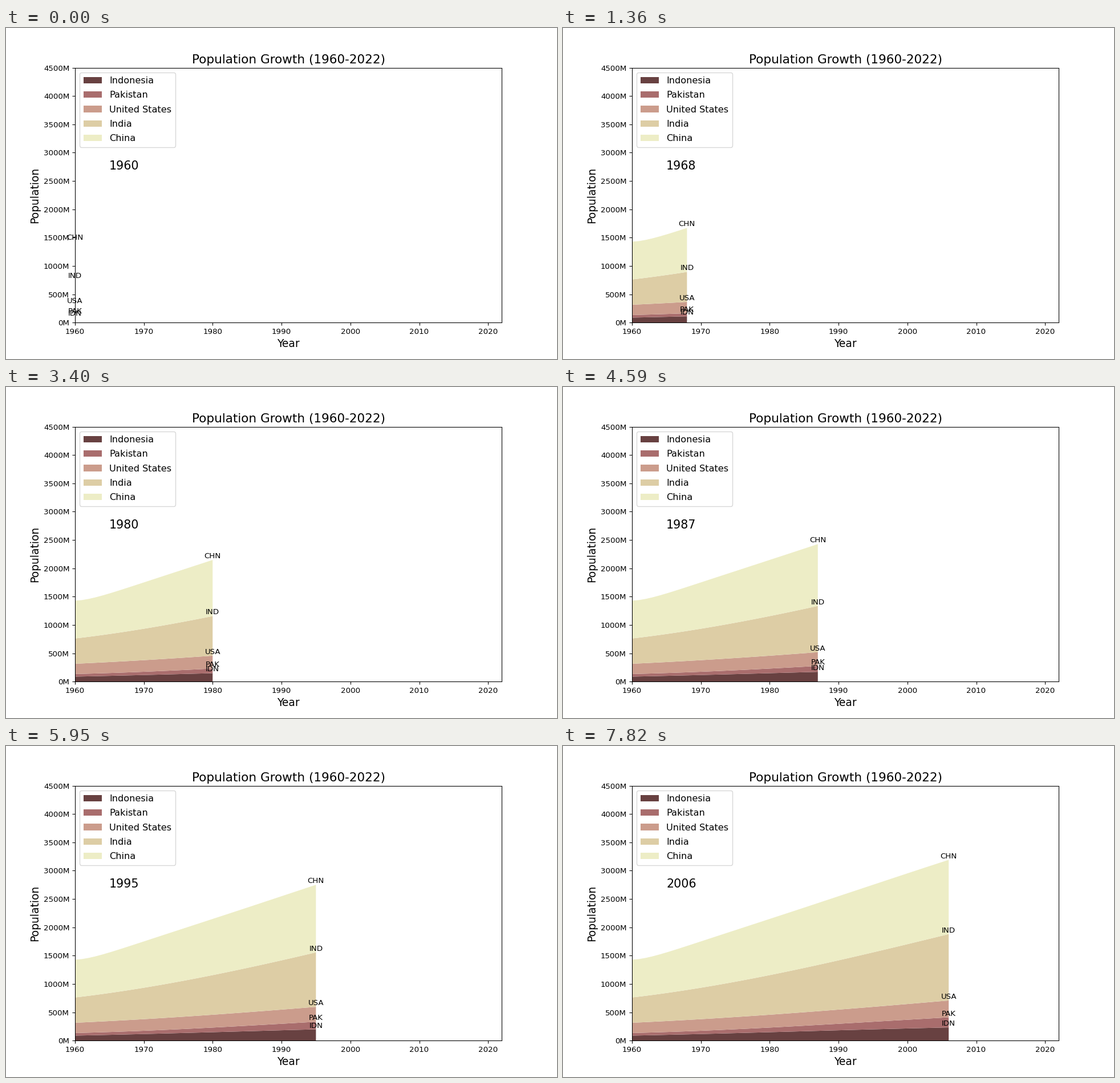
These frames come from a looping animation (966x580 px, 7.99 s). A matplotlib script:

```python
import matplotlib.pyplot as plt
import numpy as np
from matplotlib.animation import FuncAnimation
from matplotlib.patches import Patch

W, H, DPI = 966, 580, 96.6
START, END, FRAMES, STEP_MS = 1960, 2022, 47, 170

# Code, name and population in millions at the key years
KEY_YEARS = np.array([1960, 1975, 1990, 2006])
COUNTRIES = [
    ("IDN", "Indonesia", (88, 132, 182, 232)),
    ("PAK", "Pakistan", (46, 68, 115, 178)),
    ("USA", "United States", (181, 216, 250, 298)),
    ("IND", "India", (446, 623, 870, 1172)),
    ("CHN", "China", (667, 920, 1132, 1311)),
]
CODES, NAMES, KEY_POPS = zip(*COUNTRIES)
COLORS = plt.cm.pink(np.linspace(0.1, 0.8, len(COUNTRIES)))

# Smooth cubic growth, with a fading dip in the early sixties for China
t = np.arange(FRAMES)
years = START + t
cubics = np.polyfit(KEY_YEARS - START, np.transpose(KEY_POPS), 3)
pops = (np.vander(t, 4) @ cubics).T
pops[-1] -= 28 * t * np.exp(-t / 4)
tops = pops.cumsum(axis=0)

plt.rcParams["font.family"] = "DejaVu Sans"
fig, ax = plt.subplots(figsize=((W + 0.01) / DPI, (H + 0.01) / DPI), dpi=DPI)
ax.set(xlim=(START, END), ylim=(0, 4500), yticks=range(0, 4501, 500))
ax.yaxis.set_major_formatter(lambda v, pos: f"{v:.0f}M")
ax.set_title("Population Growth (1960-2022)", fontsize=16)
ax.set_xlabel("Year", fontsize=14)
ax.set_ylabel("Population", fontsize=14)
ax.legend(handles=[Patch(facecolor=c, label=n) for c, n in zip(COLORS, NAMES)],
          loc="upper left", fontsize=12, labelspacing=0.645, borderpad=0.45)

year_text = ax.text(1965, 2700, "", fontsize=15.4)
tags = [ax.text(START, 0, code, fontsize=10, ha="center", va="bottom")
        for code in CODES]
areas = []


def draw(i):
    while areas:
        areas.pop().remove()
    if i > 0:
        areas.extend(ax.stackplot(years[:i + 1], pops[:, :i + 1], colors=COLORS))
        ax.set(xlim=(START, END), ylim=(0, 4500))
    year_text.set_text(str(years[i]))
    for tag, top in zip(tags, tops[:, i]):
        tag.set_position((years[i], top))
    return [*areas, year_text, *tags]


anim = FuncAnimation(fig, draw, frames=FRAMES, init_func=lambda: draw(0),
                     interval=STEP_MS, repeat=True, repeat_delay=0)
plt.show()
```
